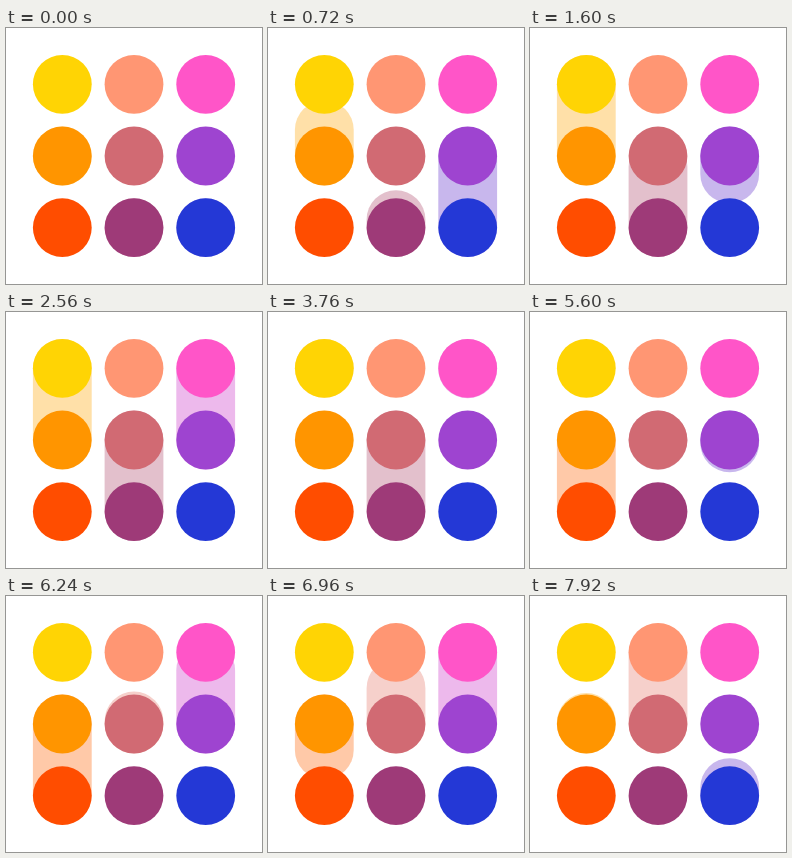
These frames come from a looping animation (256 by 256 pixels, 8000 ms). An HTML page without scripts:

```html
<!DOCTYPE html>
<html lang="en">
<head>
<meta charset="utf-8">
<title>Dots and trails</title>
<style>
html, body { margin: 0; width: 100%; height: 100%; overflow: hidden; background: #fff; }
svg { display: block; width: 100vw; height: 100vh; }

/* Each trail grows from the lower dot, rests, then shrinks into the upper one. */
.trails path {
  stroke-width: 58.8;
  stroke-linecap: round;
  stroke-dasharray: 0px 200px;
  stroke-dashoffset: -99px;
  animation: 8s cubic-bezier(.65, 0, .35, 1) infinite;
}
.trails .l1 { animation-name: left-low; }
.trails .l2 { animation-name: left-high; }
.trails .m1 { animation-name: mid-low; }
.trails .m2 { animation-name: mid-high; }
.trails .r1 { animation-name: right-low; }
.trails .r2 { animation-name: right-high; }

@keyframes right-low {
  0%, 48% { stroke-dasharray: 0px 200px; stroke-dashoffset: 0px; }
  10%, 14%, 58%, 62% { stroke-dasharray: 71.7px 200px; stroke-dashoffset: 0px; }
  24%, 72% { stroke-dasharray: 71.7px 200px; stroke-dashoffset: -71.7px; }
  24.01%, 47.99%, 72.01%, 95.99% { stroke-dasharray: 0px 200px; stroke-dashoffset: -99px; }
  96% {
    stroke-dasharray: 0px 200px; stroke-dashoffset: 0px;
    animation-timing-function: cubic-bezier(.533, 0, .81, .427);
  }
  100% { stroke-dasharray: 18.1px 200px; stroke-dashoffset: 0px; }
}
@keyframes right-high {
  0%, 23.99%, 48.01%, 71.99%, 96.01%, 100% { stroke-dasharray: 0px 200px; stroke-dashoffset: -99px; }
  24%, 72% { stroke-dasharray: 0px 200px; stroke-dashoffset: 0px; }
  34%, 38%, 82%, 86% { stroke-dasharray: 71.7px 200px; stroke-dashoffset: 0px; }
  48%, 96% { stroke-dasharray: 71.7px 200px; stroke-dashoffset: -71.7px; }
}
@keyframes left-high {
  0% { stroke-dasharray: 0px 200px; stroke-dashoffset: 0px; }
  20%, 28% { stroke-dasharray: 71.7px 200px; stroke-dashoffset: 0px; }
  48% { stroke-dasharray: 71.7px 200px; stroke-dashoffset: -71.7px; }
  48.01%, 95.99% { stroke-dasharray: 0px 200px; stroke-dashoffset: -99px; }
  96% {
    stroke-dasharray: 0px 200px; stroke-dashoffset: 0px;
    animation-timing-function: cubic-bezier(.4, 0, .727, .363);
  }
  100% { stroke-dasharray: 3px 200px; stroke-dashoffset: 0px; }
}
@keyframes left-low {
  0%, 47.99%, 96.01%, 100% { stroke-dasharray: 0px 200px; stroke-dashoffset: -99px; }
  48% { stroke-dasharray: 0px 200px; stroke-dashoffset: 0px; }
  68%, 76% { stroke-dasharray: 71.7px 200px; stroke-dashoffset: 0px; }
  96% { stroke-dasharray: 71.7px 200px; stroke-dashoffset: -71.7px; }
}
@keyframes mid-low {
  0% { stroke-dasharray: 0px 200px; stroke-dashoffset: 0px; }
  30%, 42% { stroke-dasharray: 71.7px 200px; stroke-dashoffset: 0px; }
  72% { stroke-dasharray: 71.7px 200px; stroke-dashoffset: -71.7px; }
  72.01%, 100% { stroke-dasharray: 0px 200px; stroke-dashoffset: -99px; }
}
@keyframes mid-high {
  0%, 71.99% { stroke-dasharray: 0px 200px; stroke-dashoffset: -99px; }
  72% {
    stroke-dasharray: 0px 200px; stroke-dashoffset: 0px;
    animation-timing-function: cubic-bezier(.671, 0, .397, .933);
  }
  100% { stroke-dasharray: 71.4px 200px; stroke-dashoffset: 0px; }
}
</style>
</head>
<body>
<svg viewBox="0 0 256 256">
  <g class="trails" fill="none">
    <path class="l1" d="M56.3 199.7v-71.7" stroke="#ffc9a8"/>
    <path class="l2" d="M56.3 128v-71.7" stroke="#ffe0a8"/>
    <path class="m1" d="M128 199.7v-71.7" stroke="#e3c0cc"/>
    <path class="m2" d="M128 128v-71.7" stroke="#f6d0cb"/>
    <path class="r1" d="M199.7 199.7v-71.7" stroke="#c8b7ed"/>
    <path class="r2" d="M199.7 128v-71.7" stroke="#edb9ec"/>
  </g>
  <g class="dots">
    <circle cx="56.3" cy="56.3" r="29.4" fill="#ffd404"/>
    <circle cx="128" cy="56.3" r="29.4" fill="#ff9673"/>
    <circle cx="199.7" cy="56.3" r="29.4" fill="#ff55c8"/>
    <circle cx="56.3" cy="128" r="29.4" fill="#ff9500"/>
    <circle cx="128" cy="128" r="29.4" fill="#d16a73"/>
    <circle cx="199.7" cy="128" r="29.4" fill="#9e44d0"/>
    <circle cx="56.3" cy="199.7" r="29.4" fill="#ff4d00"/>
    <circle cx="128" cy="199.7" r="29.4" fill="#9e3a78"/>
    <circle cx="199.7" cy="199.7" r="29.4" fill="#2438d6"/>
  </g>
</svg>
</body>
</html>
```
